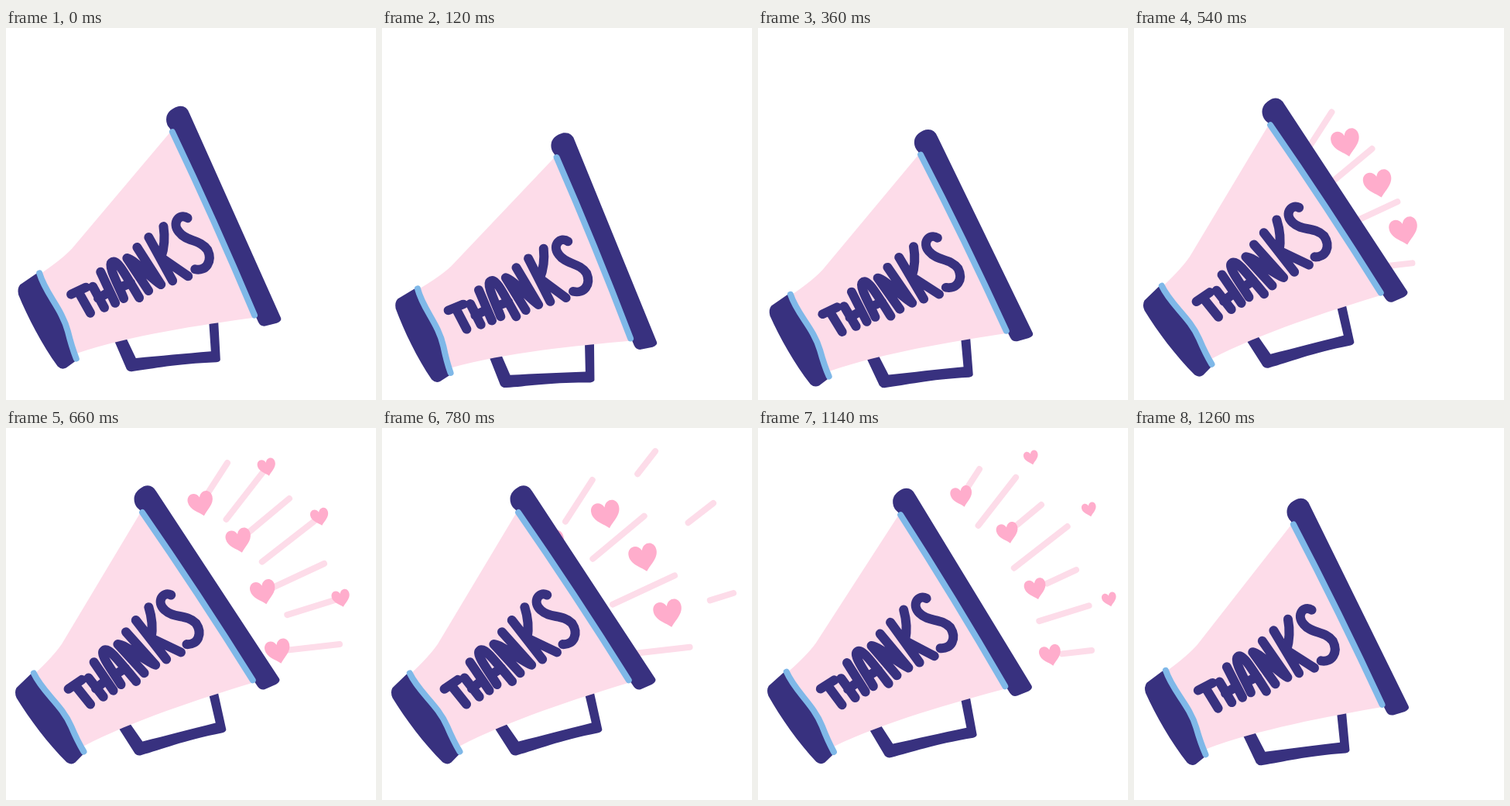
Write an HTML page with a canvas that moves like this. It is 478x480 px and loops after 1320 ms.

```html
<!DOCTYPE html>
<html lang="en">
<head>
<meta charset="utf-8">
<title>Thanks</title>
<style>
html, body { margin: 0; width: 100%; height: 100%; overflow: hidden; background: #fff; }
canvas { display: block; width: 478px; height: 480px; }
</style>
</head>
<body>
<canvas id="stage" width="478" height="480"></canvas>
<script>
const ctx = document.getElementById('stage').getContext('2d');
const STEP = 60, STEPS = 22, REST = 18, TOP = 327;
const NAVY = '#38317f', BLUE = '#7fb8e8', BLUSH = '#fddce9', PINK = '#ffadcc';

const body = new Path2D('M213 133L323 374C250 384 160 398 92 421L44 319Q72 300 85 286L213 133Z');
const rim = new Path2D('M206 119Q206 107 221 102Q232 100 236 111L355 374Q357 378 350 381L335 385Q329 386 326 380L211 131Q206 126 206 119Z');
const mouth = new Path2D('M18 333L41 317C50 345 72 370 82 402Q87 418 90 431L78 440Q72 443 67 438C47 411 28 375 16 346Q14 338 18 333Z');
const grip = new Path2D('M138 400L156 441Q159 445 164 444C190 441 220 434 272 432Q278 431 277 427L274 376H262L265 418C230 421 200 424 168 427L155 400Z');
const rimBand = new Path2D('M214 135Q269 249 321 371');
const mouthBand = new Path2D('M43 318C51 345 72 363 80 393Q85 413 91 428');
const lettering = new Path2D(
  'M84 345L103 336M93 341L109 369' +
  'M112 335L127 362M122 316L141 356M119 350L133 342' +
  'M152 350C146 335 131 308 136 304C142 298 150 312 172 349M147 336L161 330' +
  'M184 340L156 298C166 300 188 325 200 332L169 284' +
  'M184 271L215 327M203 257C205 270 204 285 200 297L235 321' +
  'M234 246C224 239 213 252 223 264C233 277 250 273 260 287C267 302 258 315 244 312');
const heartShape = new Path2D('M0 18C-6 11-18 5-18-6C-18-18-4-20 0-9C4-20 18-18 18-6C18 5 6 11 0 18Z');

const clamp = v => Math.min(1, Math.max(0, v));
const smooth = p => p * p * (3 - 2 * p);
const mix = (a, b, p) => a + (b - a) * p;

// Each fan of lanes starts on a line inside the horn and ends at its own tip.
const fan = (x, y, dx, dy, tips) => tips.map((tip, i) => ({ from: [x + dx * i, y + dy * i], tip }));
const outer = fan(258, 152, 35, 50, [[353, 30], [428, 97], [454, 213]]);
const inner = fan(218, 150, 18, 49, [[286, 45], [366, 91], [411, 175], [431, 279]]);
const waves = [8.5, 12, 16];

const at = ({ from, tip }, u) => [mix(from[0], tip[0], u), mix(from[1], tip[1], u)];

function line(path, color, width) {
  ctx.strokeStyle = color;
  ctx.lineWidth = width;
  ctx.stroke(path);
}

function fill(path, color) {
  ctx.fillStyle = color;
  ctx.fill(path);
}

// Swing up and hold, then drop back past the end of the loop.
function poseAt(k) {
  const t = k < 3 ? k + STEPS : k;
  const up = t < REST;
  const angle = up
    ? mix(3.1, -9, clamp((t - 3) / 6) ** 1.6)
    : mix(-9, 3.1, Math.sin(clamp((t - 18.3) / 6.7) * Math.PI / 2));
  const y = up
    ? mix(409, TOP, smooth(clamp((t - 4) / 7)))
    : mix(TOP, 409, clamp((t - REST) / 6.4) ** 1.25);
  return { angle, y, squash: 1 - .03 * clamp((y - 373) / 20) };
}

function rays(lanes, age) {
  const head = Math.min(1, .55 + .24 * age), tail = .04 + .24 * age;
  if (age < 0 || tail > .95) return;
  for (const lane of lanes) {
    const path = new Path2D();
    path.moveTo(...at(lane, tail));
    path.lineTo(...at(lane, head));
    line(path, BLUSH, 8);
  }
}

function hearts(lanes, age) {
  const u = age / 3;
  if (u < 0 || u > 1.12) return;
  const size = mix(1.02, .52, clamp((u - .35) / .65));
  for (const lane of lanes) {
    ctx.save();
    ctx.translate(...at(lane, u));
    ctx.rotate(-.24);
    ctx.scale(size, size);
    fill(heartShape, PINK);
    ctx.restore();
  }
}

function burst(k) {
  for (const start of waves) {
    const age = k - start;
    rays(inner, Math.floor(age));
    rays(outer, Math.floor(age - 1.5));
  }
  for (const start of waves) {
    hearts(outer, k - start);
    hearts(inner, k - start - 1);
  }
}

function megaphone({ angle, y, squash }) {
  ctx.translate(323 + Math.min(0, angle) * .22, y);
  ctx.scale(1, squash);
  ctx.rotate(angle * Math.PI / 180);
  ctx.translate(-323, -373);
  fill(grip, NAVY);
  fill(body, BLUSH);
  fill(rim, NAVY);
  fill(mouth, NAVY);
  line(rimBand, BLUE, 8);
  line(mouthBand, BLUE, 8);
  line(lettering, NAVY, 12);
}

function draw(now) {
  const k = Math.floor(now / STEP) % STEPS;
  const pose = poseAt(k);
  ctx.fillStyle = '#fff';
  ctx.fillRect(0, 0, 478, 480);
  ctx.lineCap = ctx.lineJoin = 'round';
  ctx.save();
  ctx.translate(0, pose.y - TOP);
  if (k < STEPS - 1) burst(k);
  ctx.restore();
  ctx.save();
  megaphone(pose);
  ctx.restore();
}

const begin = performance.now();
function tick() {
  draw(performance.now() - begin);
  requestAnimationFrame(tick);
}
tick();
</script>
</body>
</html>
```
